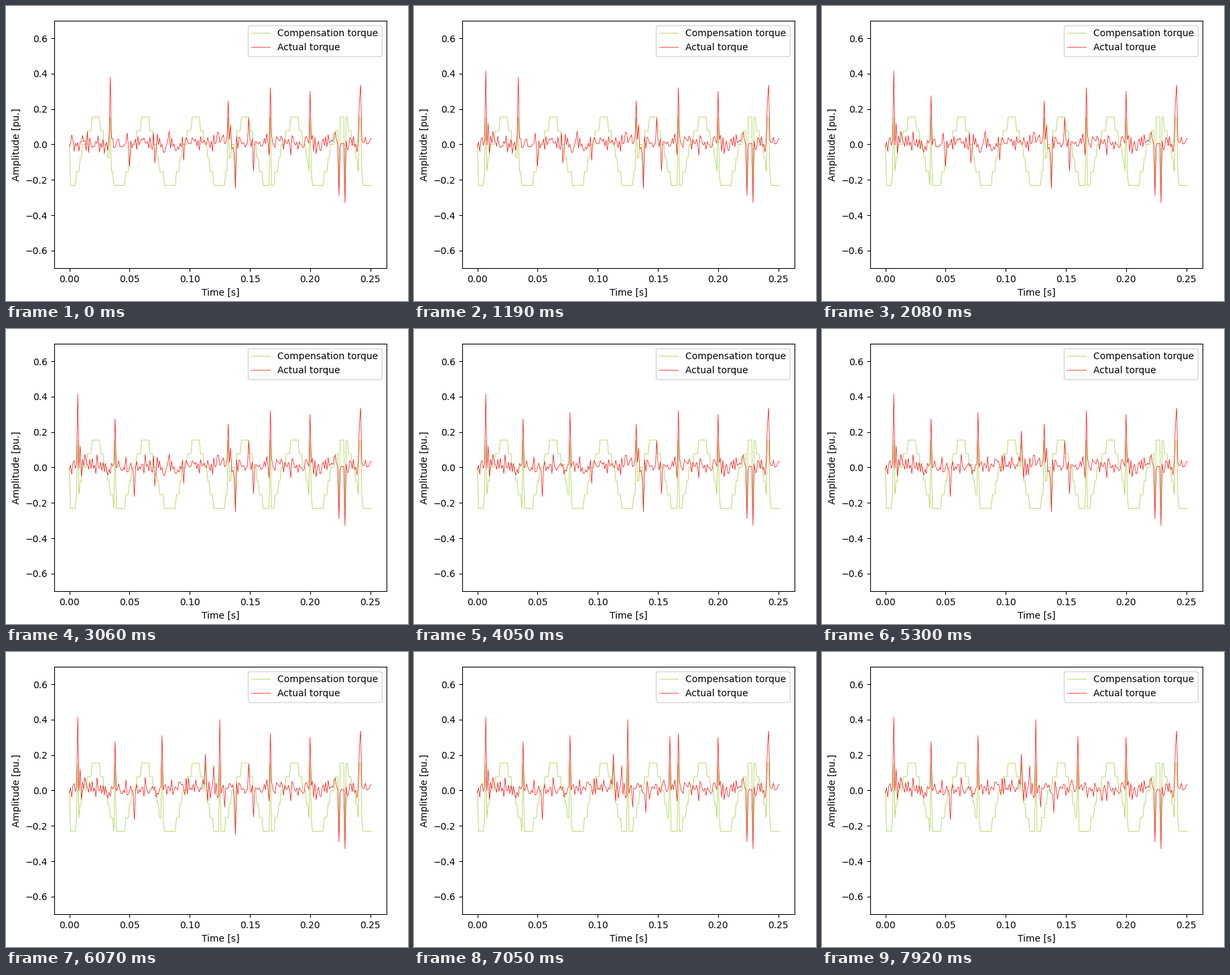
Write a matplotlib script that moves like this. It is 600 px wide and 440 px high and loops after 8000 ms.

```python
import numpy as np
import matplotlib.pyplot as plt
from matplotlib.animation import FuncAnimation

W, H = 600, 440
LOOP, STEP = 8000, 40
HOLD = 500             # ms before the sweep starts
RATE = 0.0243          # samples rewritten per ms
N, SWEPT = 252, 181    # samples in all, samples rewritten by the end
UNIT = 1 / 13          # height of one compensation level
idx = np.arange(N)

# Sample number and height of the torque bursts.
OLD_BURSTS = {34: 0.38, 50: -0.125, 71: -0.105, 95: -0.09, 132: 0.245,
              134: 0.11, 138: -0.25, 149: 0.15, 153: -0.15, 167: 0.32}
NEW_BURSTS = {7: 0.415, 9: 0.12, 38: 0.275, 54: -0.165, 77: 0.31,
              113: 0.205, 120: 0.14, 125: 0.4, 129: -0.095, 140: -0.125,
              160: 0.305}
TAIL_BURSTS = {200: 0.3, 224: -0.29, 229: -0.33, 241: 0.25, 242: 0.335}


def torque(bursts, seed):
    """Low noise with single-sample bursts."""
    noise = np.random.default_rng(seed).normal(0.007, 0.028, N)
    y = np.clip(noise, -0.06, 0.075)
    for i, height in bursts.items():
        y[i] = height
    return y


def compensation(actual):
    """Regular staircase that jumps to a limit on every strong burst."""
    phase = (idx + 4.5) % 41.3
    edges = [10, 13, 15, 19, 23, 30, 33, 36, 38]
    levels = np.array([-3, -2, -1, 0, 1, 2, 1, 0, -1, -2])
    level = levels[np.searchsorted(edges, phase, side="right")]
    level[actual > 0.2] = 2
    level[actual < -0.24] = -3
    level[0] = 0
    return level * UNIT


def head(t):
    """Number of samples rewritten at time t."""
    if t < HOLD:
        return 0
    return min(int(2 + RATE * (t - HOLD)), SWEPT)


old_torque = torque({**OLD_BURSTS, **TAIL_BURSTS}, 4)
new_torque = torque({**NEW_BURSTS, **TAIL_BURSTS}, 9)
old = [compensation(old_torque), old_torque]
new = [compensation(new_torque), new_torque]

fig = plt.figure(figsize=(W / 100, H / 100), dpi=100)
ax = fig.add_axes([72 / W, 48.8 / H, 496 / W, 369.6 / H])
time = idx / 1000
styles = [("yellowgreen", "Compensation torque"), ("red", "Actual torque")]
lines = [ax.plot(time, y, color=color, lw=0.5, label=label)[0]
         for y, (color, label) in zip(old, styles)]
ax.set_ylim(-0.7, 0.7)
ax.set_xlabel("Time [s]")
ax.set_ylabel("Amplitude [pu.]")
ax.legend(loc="upper right")


def update(frame):
    written = idx < head((frame + 0.5) * STEP)
    for line, before, after in zip(lines, old, new):
        line.set_ydata(np.where(written, after, before))
    return lines


anim = FuncAnimation(fig, update, frames=LOOP // STEP, interval=STEP,
                     repeat=True, repeat_delay=0)
plt.show()
```
